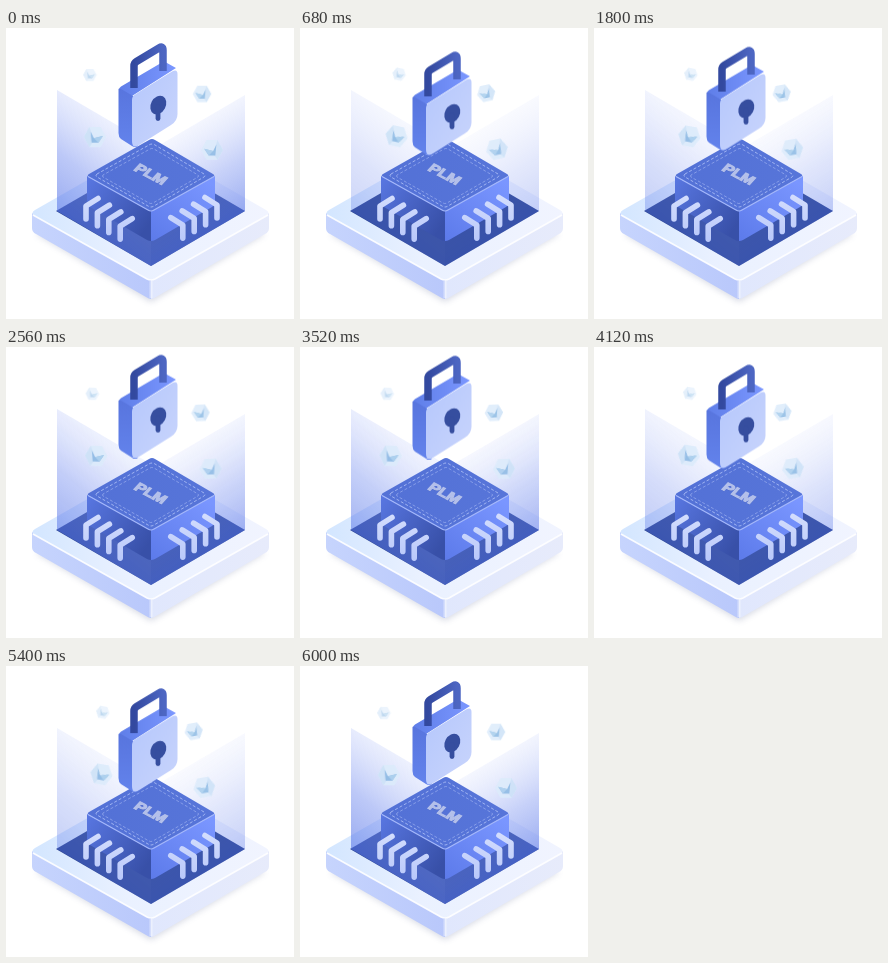
An HTML page for the animation above (6040 ms loop, 288 by 291 pixels).

```html
<!DOCTYPE html>
<html lang="en">
<head>
<meta charset="utf-8">
<title>Isometric lock and chip</title>
<style>
  html, body { margin: 0; width: 100%; height: 100%; overflow: hidden; background: #fff; }
  svg { display: block; width: 100%; height: 100%; }
  .lock, .walls, .drift, .spin {
    animation: 6.04s cubic-bezier(.333, 0, .667, 1) infinite;
  }
  .lock { animation-name: bob; }
  .walls { animation-name: glow; }
  .drift { animation-name: drift; }
  .spin { animation-name: spin; }
  /* Beats at 0, 1, 3, 5 and 6 s, then a short hold. */
  @keyframes bob {
    0%, 99.338%, 100% { transform: translateY(0); }
    16.556%, 82.781% { transform: translateY(11px); }
    49.669% { transform: translateY(-10px); }
  }
  @keyframes glow {
    0%, 49.669%, 99.338%, 100% { opacity: 1; }
    16.556%, 82.781% { opacity: .34; }
  }
  @keyframes drift {
    0%, 49.669%, 99.338%, 100% { transform: translate(0, 0); }
    16.556%, 82.781% { transform: translate(var(--dx), -1px); }
  }
  @keyframes spin {
    0%, 49.669%, 99.338%, 100% { transform: rotate(0); }
    16.556%, 82.781% { transform: rotate(16deg); }
  }
</style>
</head>
<body>
<svg viewBox="0 0 288 291" preserveAspectRatio="none">
  <defs>
    <linearGradient id="wallL" gradientUnits="userSpaceOnUse" x1="45" y1="185" x2="118" y2="95">
      <stop offset="0" stop-color="#5472e6" stop-opacity=".62"/>
      <stop offset=".45" stop-color="#7a92f0" stop-opacity=".5"/>
      <stop offset="1" stop-color="#b9c7fb" stop-opacity=".2"/>
    </linearGradient>
    <linearGradient id="wallR" gradientUnits="userSpaceOnUse" x1="242" y1="188" x2="180" y2="92">
      <stop offset="0" stop-color="#5472e6" stop-opacity=".62"/>
      <stop offset=".45" stop-color="#7a92f0" stop-opacity=".42"/>
      <stop offset="1" stop-color="#b9c7fb" stop-opacity=".1"/>
    </linearGradient>
    <linearGradient id="slab" x1="0" y1="0" x2="1" y2="0">
      <stop offset="0" stop-color="#d3e6ff"/>
      <stop offset=".4" stop-color="#eaf1ff"/>
      <stop offset="1" stop-color="#f1f4ff"/>
    </linearGradient>
    <linearGradient id="slabL" x1="0" y1="0" x2="1" y2="0">
      <stop offset="0" stop-color="#c6d4fd"/>
      <stop offset="1" stop-color="#b9c8fb"/>
    </linearGradient>
    <linearGradient id="slabR" x1="0" y1="0" x2="1" y2="0">
      <stop offset="0" stop-color="#e0e7fd"/>
      <stop offset="1" stop-color="#e7ebfb"/>
    </linearGradient>
    <linearGradient id="chipTop" x1="0" y1="0" x2="1" y2="0">
      <stop offset="0" stop-color="#5371d6"/>
      <stop offset="1" stop-color="#5775d9"/>
    </linearGradient>
    <linearGradient id="chipL" x1="0" y1="0" x2="1" y2=".7">
      <stop offset="0" stop-color="#5977e2"/>
      <stop offset="1" stop-color="#3850a8"/>
    </linearGradient>
    <linearGradient id="chipR" x1="0" y1="1" x2=".8" y2="0">
      <stop offset="0" stop-color="#5c7aea"/>
      <stop offset="1" stop-color="#7a96ff"/>
    </linearGradient>
    <linearGradient id="legs" gradientUnits="userSpaceOnUse" x1="0" y1="168" x2="0" y2="214">
      <stop offset="0" stop-color="#d3ddfd"/>
      <stop offset="1" stop-color="#b9c8fa"/>
    </linearGradient>
    <linearGradient id="front" x1="0" y1="0" x2="1" y2="1">
      <stop offset="0" stop-color="#b5c7fc"/>
      <stop offset="1" stop-color="#c9d5fc"/>
    </linearGradient>
    <linearGradient id="side" x1="0" y1="0" x2="0" y2="1">
      <stop offset="0" stop-color="#5875de"/>
      <stop offset="1" stop-color="#6383ec"/>
    </linearGradient>
    <linearGradient id="cap" x1="0" y1="0" x2="1" y2="0">
      <stop offset="0" stop-color="#5f7ee8"/>
      <stop offset="1" stop-color="#7b97ff"/>
    </linearGradient>
    <linearGradient id="steel" x1="0" y1="0" x2="1" y2="0">
      <stop offset="0" stop-color="#33499f"/>
      <stop offset="1" stop-color="#4d66c2"/>
    </linearGradient>
    <filter id="blur" x="-20%" y="-20%" width="140%" height="140%"><feGaussianBlur stdDeviation="3"/></filter>
    <g id="gem">
      <path d="M-10 0-5-9H5L10 0 5 9H-5Z" fill="#dcebfb"/>
      <path d="M-10 0-5-9-3-3-1 3-5 9Z" fill="#cde2f7"/>
      <path d="M-4-5-1 1 7-1 3 5H-3Z" fill="#8bb9e3"/>
      <path d="M-1 1 7-1 3 5Z" fill="#a6cdec"/>
    </g>
  </defs>

  <!-- Platform -->
  <path d="M30 206 145 274 259 206 145 142Z" fill="#7d86a8" opacity=".3" filter="url(#blur)"/>
  <path d="M26 185V200Q26 204 30 206L140 269Q143 271 145 271V252Z" fill="url(#slabL)"/>
  <path d="M263 185V200Q263 204 259 206L150 269Q147 271 145 271V252Z" fill="url(#slabR)"/>
  <path d="M29 182Q24 185 29 188L141 251Q145 253 149 251L260 188Q265 185 260 182L149 118Q145 116 141 118Z" fill="url(#slab)"/>
  <path d="M27 187 141 251Q145 253 149 251L262 187" fill="none" stroke="#fff" stroke-width="1.6" opacity=".9"/>
  <path d="M145 253V270" stroke="#fff" stroke-width="3" opacity=".4"/>
  <path d="M50 183 145 128 239 183 145 238Z" fill="#2a4391"/>

  <g class="walls">
    <path d="M51 62 145 117V238L51 183Z" fill="url(#wallL)"/>
    <path d="M239 67 145 122V238L239 183Z" fill="url(#wallR)"/>
  </g>

  <!-- Chip -->
  <path d="M81 148V174Q81 177 84 179L141 212Q143 213 145 213V183Z" fill="url(#chipL)"/>
  <path d="M209 148V174Q209 177 206 179L149 212Q147 213 145 213V183Z" fill="url(#chipR)"/>
  <path d="M83 146Q80.500 147.500 83 149L142 182Q145 184 148 182L207 149Q209.500 147.500 207 146L149 112Q146 110 143 112Z" fill="url(#chipTop)"/>
  <path d="M82 148.500 142 182Q145 184 148 182L208 148.500" fill="none" stroke="#a5b8fb" stroke-width="1.200"/>
  <g fill="none" stroke="#b4c4f8" stroke-width=".8" stroke-dasharray="3 2">
    <path d="M91 146Q89 147.500 91 149L142 178Q145 180 148 178L198 149Q200 147.500 198 146L149 117Q146 115 143 117Z"/>
    <path d="M97 147Q96 148 97 149L143 175Q145 176 147 175L192 149Q193 148 192 147L148 121Q146 120 144 121Z" opacity=".65"/>
  </g>
  <g font-family="'Liberation Sans', Arial, sans-serif" font-weight="700" font-size="15">
    <text transform="matrix(.93 .48 -.6 .66 127 143)" fill="#3f58b4" opacity=".6">PLM</text>
    <text transform="matrix(.93 .48 -.6 .66 127 142)" fill="#b4c0ea" stroke="#b4c0ea" stroke-width="1.300">PLM</text>
  </g>
  <g id="pins" fill="none" stroke="url(#legs)" stroke-width="5.6" stroke-linecap="round" stroke-linejoin="round"></g>

  <g id="gems"></g>

  <!-- Lock -->
  <g class="lock">
    <path d="M113 62Q113 59.500 115 58.500L155 35Q158 33 161 35L170 40 126 68Z" fill="url(#cap)"/>
    <path d="M112.500 61V105Q112.500 109 115 111L126 118Q129 120 132 118L128 68.500 115 61Q113 60 112.500 61Z" fill="url(#side)"/>
    <path d="M128 60V38Q128 35 130.500 33.500L153 20Q157 17.500 157 22V43" fill="none" stroke="url(#steel)" stroke-width="7.500"/>
    <path d="M126 72Q126 68 129 66.500L166 43.500Q171.500 40.500 171.500 46V86Q171.500 93 165 97L134 116.500Q126 122 126 113Z" fill="url(#front)"/>
    <ellipse cx="152.300" cy="77" rx="7.400" ry="9.800" transform="rotate(28 152.300 77)" fill="#364e9f"/>
    <path d="M152 79V90.500" stroke="#364e9f" stroke-width="4.800" stroke-linecap="round"/>
  </g>
</svg>
<script>
  const pins = document.getElementById('pins');
  const gems = document.getElementById('gems');

  let legs = '';
  for (let i = 0; i < 4; i++) {
    const step = 11.4 * i, drop = 6.7 * i;
    legs += `<path d="M${92 + step} ${170.5 + drop}l-12 7.500v13"/>`;
    legs += `<path d="M${199 - step} ${169.5 + drop}l12 7.500v13"/>`;
  }
  pins.innerHTML = legs;

  // x, y, scale, mirror, travel, opacity
  const spots = [
    [84, 47, .68, 1, 20, .55],
    [196, 66, .92, -1, -13, .85],
    [89, 109, 1.12, 1, 10, .9],
    [206, 122, 1.1, -1, -12, .85]
  ];
  gems.innerHTML = spots.map(([x, y, size, flip, dx, alpha]) =>
    `<g class="drift" style="--dx:${dx}px" opacity="${alpha}">
      <g transform="translate(${x} ${y}) scale(${size * flip} ${size})">
        <g class="spin"><use href="#gem"/></g>
      </g>
    </g>`).join('');
</script>
</body>
</html>
```
